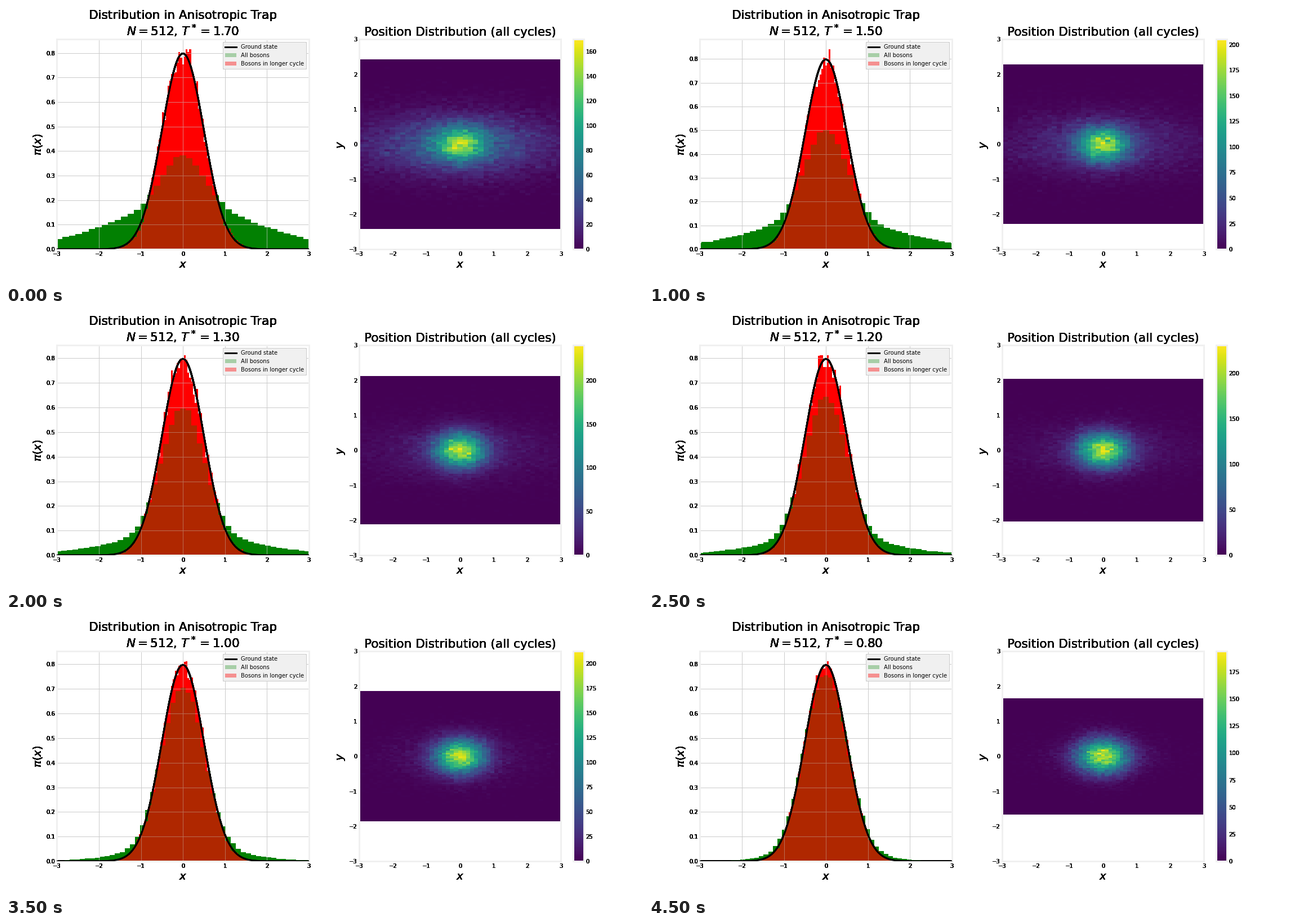
A matplotlib script for the animation above (5 s loop, 1131 by 495 pixels).

```python
import numpy as np
import matplotlib.pyplot as plt
from matplotlib.animation import FuncAnimation
from matplotlib.axes import Axes

WIDTH, HEIGHT, DPI = 1131, 495, 72
FRAMES, INTERVAL = 10, 500
SIGMA_X, SIGMA_Y = 0.5, 0.33
ROWS = 70

plt.rcParams.update({
    "font.family": "DejaVu Sans", "font.size": 10, "mathtext.fontset": "dejavusans",
    "axes.edgecolor": "#f0f0f0", "axes.linewidth": 3, "axes.axisbelow": True,
    "axes.titlesize": 21.6, "axes.labelsize": 20, "axes.titlepad": 6,
    "grid.color": "#cbcbcb", "grid.linewidth": 1,
    "xtick.major.size": 0, "ytick.major.size": 0,
    "xtick.labelsize": 10, "ytick.labelsize": 10,
})


class LayeredAxes(Axes):
    """Axes painted several times over themselves, so soft edges turn solid."""
    passes = 6

    def draw(self, renderer):
        for _ in range(self.passes):
            super().draw(renderer)


class Trap:
    """Smooth model of the gas: a narrow condensate inside a thermal cloud."""

    def __init__(self, i):
        cooling = i / (FRAMES - 1)
        self.temperature = 1.7 - 0.1 * i
        self.rng = np.random.default_rng(40 + i)
        self.cloud_top = 0.045 + 0.13 * (1 - cooling)**2
        self.core_top = 0.38 + 0.6 * cooling - 0.22 * cooling**2 - self.cloud_top
        self.cloud_x = 1.75 - 0.75 * cooling**2
        self.cloud_y = 0.31 * self.cloud_x
        self.bin_width = 0.155 - 0.045 * cooling
        self.reach_y = 1.86 * np.sqrt(self.temperature)
        self.red_noise = 0.036 - 0.018 * cooling
        self.red_top = 0.812 + 0.075 * np.exp(-2 * (i - 1.3)**2)
        self.count_max = np.interp(i, [0, 4, 9], [170, 240, 194])

    def red(self):
        edges = bin_edges(2.2, 0.043)
        density = ground_state(centers(edges))
        noise = self.rng.standard_normal(density.size)
        density += self.red_noise * np.sqrt(density) * noise
        density[density.argmax()] = self.red_top
        return np.clip(density, 0, self.red_top), edges

    def green(self, edges):
        x = centers(edges)
        density = self.cloud_top * bell(x, self.cloud_x) + self.core_top * bell(x, SIGMA_X)
        noise = self.rng.standard_normal(x.size)
        return np.maximum(density + 0.006 * np.sqrt(density) * noise, 0)

    def counts(self, x_edges, y_edges):
        x, y = np.meshgrid(centers(x_edges), centers(y_edges))
        core = self.core_top / SIGMA_Y * bell(x, SIGMA_X) * bell(y, SIGMA_Y)
        cloud = self.cloud_top / self.cloud_y * bell(x, self.cloud_x) * bell(y, self.cloud_y)
        density = core + cloud
        peak = self.count_max - 1.3 * np.sqrt(self.count_max)
        return self.rng.poisson(density / density.max() * peak)


def bell(x, sigma):
    return np.exp(-x**2 / (2 * sigma**2))


def ground_state(x):
    return np.sqrt(2 / np.pi) * bell(x, SIGMA_X)


def centers(edges):
    return (edges[1:] + edges[:-1]) / 2


def bin_edges(reach, width):
    n = int(np.ceil(reach / width))
    return (np.arange(-n, n + 2) - 0.5) * width


def add_axes(left, width, passes=6):
    ax = LayeredAxes(fig, [left, 0.125, width, 0.755], facecolor="none")
    ax.passes = passes
    return fig.add_axes(ax)


fig = plt.figure(figsize=(WIDTH / DPI, HEIGHT / DPI), dpi=DPI, facecolor="white")
panel = 0.87 / 2.2
right = 0.08 + 1.2 * panel
hist_ax = add_axes(0.08, panel, passes=12)
map_ax = add_axes(right, 0.8 * panel)
bar_ax = add_axes(right + 0.85 * panel, 0.755 * HEIGHT / 20 / WIDTH)

hist_ax.grid(True)
hist_ax.set(xlim=(-3, 3), xlabel="$x$", ylabel=r"$\pi(x)$")
curve_x = np.linspace(-3, 3, 301)
hist_ax.plot(curve_x, ground_state(curve_x), color="black", lw=3, zorder=3,
             label="Ground state")
green = hist_ax.stairs([0], [0, 1], fill=True, color="green", alpha=0.3,
                       label="All bosons")
red = hist_ax.stairs([0], [0, 1], fill=True, color="red", alpha=0.4,
                     label="Bosons in longer cycle")
hist_ax.legend(loc="upper right", fontsize=10, facecolor="#f0f0f0", framealpha=1)

map_ax.set(xlabel="$x$", ylabel="$y$", title="Position Distribution (all cycles)")
mesh = map_ax.pcolormesh([[0, 1]], cmap="viridis", vmin=0, vmax=1)
colorbar = fig.colorbar(mesh, cax=bar_ax)


def update(i):
    global mesh
    trap = Trap(i)
    x_edges = bin_edges(3.2, trap.bin_width)
    y_edges = np.linspace(-trap.reach_y, trap.reach_y, ROWS + 1)

    green.set_data(trap.green(x_edges), x_edges)
    red.set_data(*trap.red())
    hist_ax.set_ylim(0, 1.05 * trap.red_top)
    hist_ax.set_title("Distribution in Anisotropic Trap\n"
                      f"$N=512$, $T^*={trap.temperature:.2f}$")

    mesh.remove()
    mesh = map_ax.pcolormesh(x_edges, y_edges, trap.counts(x_edges, y_edges),
                             cmap="viridis", vmin=0, vmax=trap.count_max)
    map_ax.set(xlim=(-3, 3), ylim=(-3, 3))
    colorbar.update_normal(mesh)
    return []


animation = FuncAnimation(fig, update, frames=FRAMES, interval=INTERVAL,
                          init_func=lambda: update(0), repeat=True, repeat_delay=0)
plt.show()
```
